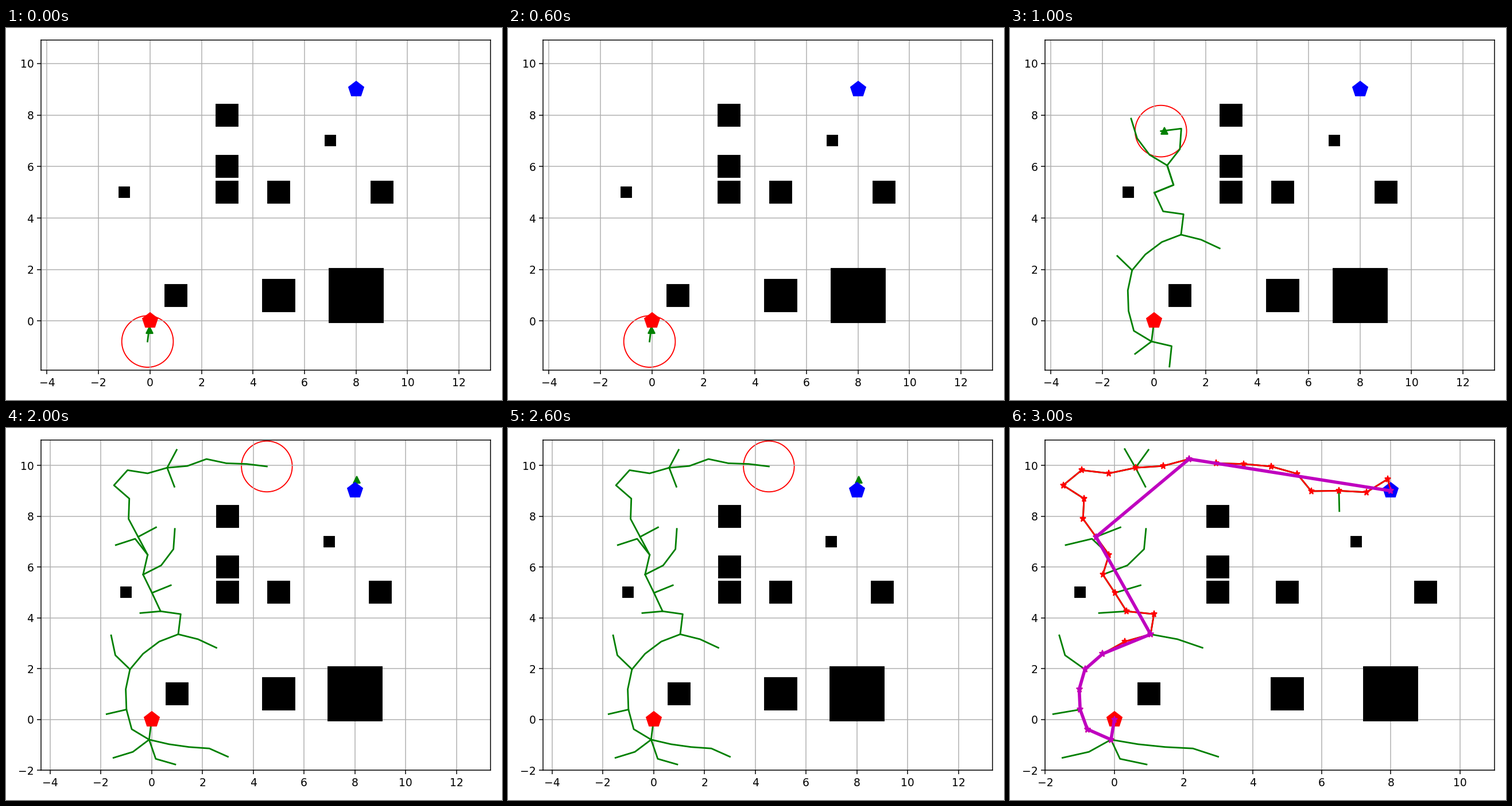
These frames come from a looping animation (864x648 px, 4000 ms). A matplotlib script:

```python
import numpy as np
import matplotlib.pyplot as plt
from matplotlib.animation import FuncAnimation
from matplotlib.patches import Circle
from matplotlib.ticker import MultipleLocator

W, H, DPI = 864, 648, 135
LEFT, RIGHT, TOP, BOTTOM = 61.4, 844.1, 21, 596.2
ASPECT = (RIGHT - LEFT) / (BOTTOM - TOP)

STEP = 0.8      # length of every tree edge
CENTER = 4.5    # middle of both axes
START, GOAL = (0, 0), (8, 9)

# Square obstacles by marker size
OBSTACLES = {
    10: [(-1, 5), (7, 7)],
    20: [(1, 1), (3, 5), (3, 6), (3, 8), (5, 5), (9, 5)],
    30: [(5, 1)],
    50: [(8, 1)],
}


def walk(start, *headings):
    """Points reached from start by equal steps along headings in degrees."""
    angles = np.radians(headings)
    moves = STEP * np.column_stack([np.cos(angles), np.sin(angles)])
    return np.vstack([start, start + np.cumsum(moves, axis=0)])


ROUTE = np.vstack([
    walk(START,
         263, 149, 105, 92, 78, 50, 37, 21,     # around the first obstacle
         83, 172, 115, 116, 77, 118, 118, 88,   # up the left side
         139, 48, 351, 16, 5, 20,               # over the top
         348, 358, 353, 339, 301, 1, 356, 40),  # across to the goal
    GOAL])
SHORTCUT = ROUTE[[0, 1, 2, 3, 4, 5, 6, 8, 14, 22, -1]]

# Side branches: route node they leave, then headings
EARLY = [(1, 217), (1, 347, 264), (5, 136), (8, 346, 335),
         (11, 22, 108, 149, 127, 107), (11, 22, 108, 52, 86, 187)]
GROWN = [(1, 217, 197), (1, 347, 352, 356, 336), (1, 289, 344), (3, 193),
         (5, 136, 102), (8, 346, 335), (10, 185), (11, 22), (12, 27, 53, 86),
         (13, 128, 198), (14, 28), (20, 62), (20, 291)]
FINAL = GROWN + [(20, 113), (28, 271)]

# half height of view, route nodes reached, branches, random sample
STAGES = [
    (6.412, 2, [], (-0.03, -0.34)),
    (6.412, 12, EARLY, (0.41, 7.39)),
    (6.5, 26, GROWN, (8.07, 9.44)),
    (6.5, len(ROUTE), FINAL, None),
]

fig = plt.figure(figsize=(W / DPI, H / DPI), dpi=DPI, facecolor="white")
ax = fig.add_axes([LEFT / W, 1 - BOTTOM / H,
                   (RIGHT - LEFT) / W, (BOTTOM - TOP) / H])


def polyline(points, style, **kwargs):
    ax.plot(*np.transpose(points), style, **kwargs)


def draw(index):
    half, reached, branches, sample = STAGES[index]
    done = reached == len(ROUTE)
    ax.clear()
    ax.grid(True)

    paths = [ROUTE[:reached]]
    paths += [walk(ROUTE[node], *headings) for node, *headings in branches]
    for path in paths:
        polyline(path, "-g")

    if not done:
        # The newest node ends the rewired branch early on, else the route
        newest = paths[-1 if branches is EARLY else 0][-1]
        ax.add_patch(Circle(newest, 1, fill=False, color="r", lw=1))
        ax.plot(*sample, "^g")

    for size, centers in OBSTACLES.items():
        polyline(centers, "sk", ms=size)
    ax.plot(*START, "pr", ms=15)
    ax.plot(*GOAL, "pb", ms=15)

    if done:
        polyline(ROUTE, "*-r")
        polyline(SHORTCUT, "*-m", lw=3)

    # Equal scales while searching, a square range for the finished path
    half_width = half if done else half * ASPECT
    ax.set_xlim(CENTER - half_width, CENTER + half_width)
    ax.set_ylim(CENTER - half, CENTER + half)
    for axis in (ax.xaxis, ax.yaxis):
        axis.set_major_locator(MultipleLocator(2))


anim = FuncAnimation(fig, draw, frames=len(STAGES), init_func=lambda: None,
                     interval=1000, repeat=True, repeat_delay=0)
plt.show()
```
